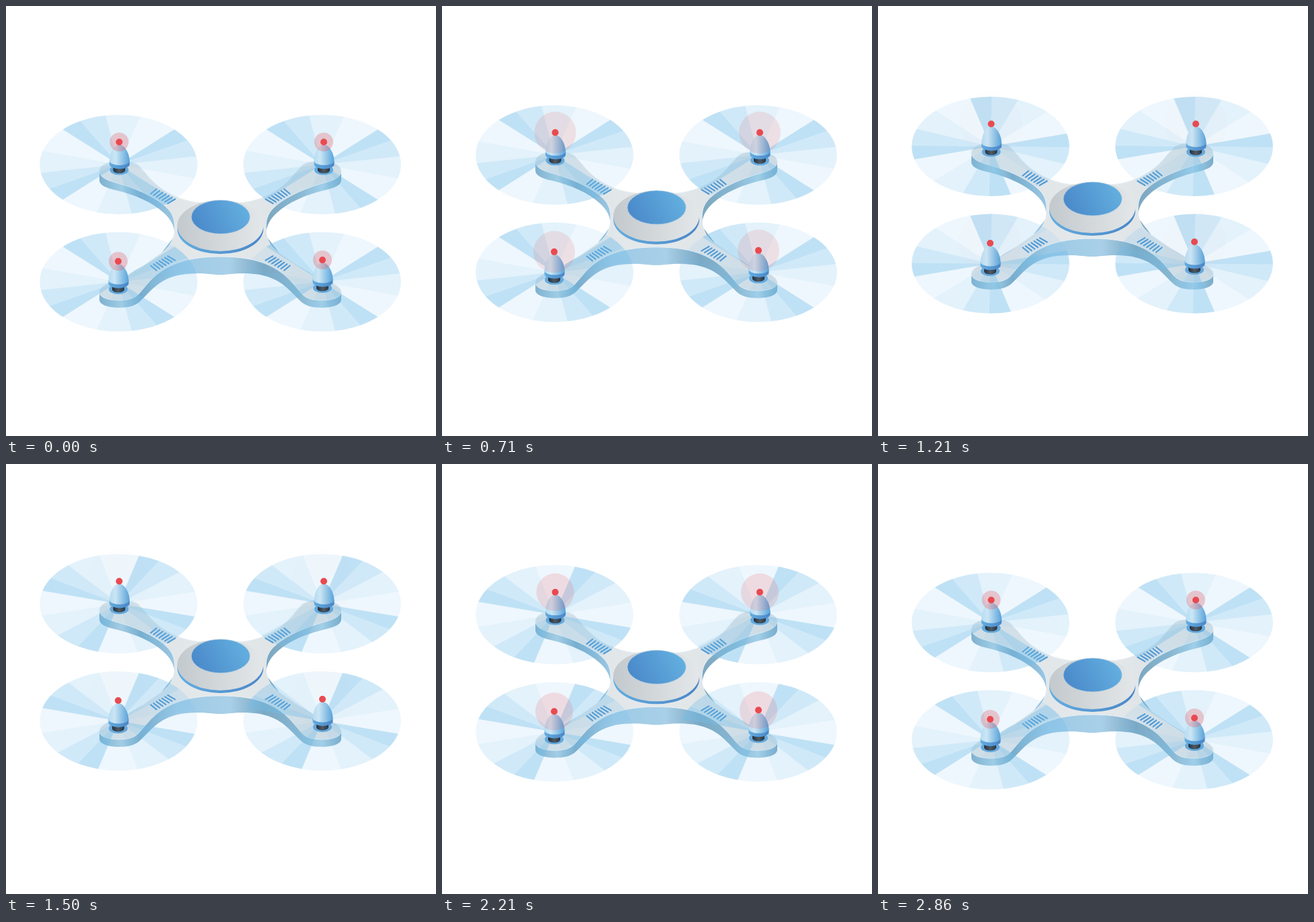
Recreate the animation shown at these times as an HTML page. Size 640 px wide and 640 px high, loop 2930 ms.

```html
<!DOCTYPE html>
<html lang="en">
<head>
<meta charset="utf-8">
<title>Drone</title>
<style>
html, body { margin: 0; width: 100%; height: 100%; overflow: hidden; background: #fff; }
svg { display: block; width: 100%; height: 100%; }
</style>
</head>
<body>
<svg viewBox="0 0 640 640">
  <defs>
    <linearGradient id="side" gradientUnits="userSpaceOnUse" x1="139" x2="499">
      <stop offset="0" stop-color="#7fafcb"/>
      <stop offset=".09" stop-color="#a9cfe3"/>
      <stop offset=".17" stop-color="#79aac8"/>
      <stop offset=".32" stop-color="#9dcae6"/>
      <stop offset=".54" stop-color="#a9d0e8"/>
      <stop offset=".68" stop-color="#7ba6bf"/>
      <stop offset=".82" stop-color="#8ab5cd"/>
      <stop offset=".92" stop-color="#a9d2e8"/>
      <stop offset="1" stop-color="#7aa9c4"/>
    </linearGradient>
    <linearGradient id="deck" gradientUnits="userSpaceOnUse" x1="139" x2="499">
      <stop offset="0" stop-color="#dbe2e6"/>
      <stop offset=".5" stop-color="#e5e9eb"/>
      <stop offset="1" stop-color="#d8dfe3"/>
    </linearGradient>
    <linearGradient id="dome">
      <stop offset="0" stop-color="#c3c9cd"/>
      <stop offset="1" stop-color="#e3e7e9"/>
    </linearGradient>
    <linearGradient id="cap" y1=".6" y2=".3">
      <stop offset="0" stop-color="#4a89ca"/>
      <stop offset="1" stop-color="#64b0e0"/>
    </linearGradient>
    <linearGradient id="rim">
      <stop offset="0" stop-color="#62ade0"/>
      <stop offset="1" stop-color="#4a86c8"/>
    </linearGradient>
    <linearGradient id="cone">
      <stop offset="0" stop-color="#b5dcf2"/>
      <stop offset=".3" stop-color="#cbe6f5"/>
      <stop offset="1" stop-color="#58a3da"/>
    </linearGradient>
    <linearGradient id="shaft">
      <stop offset="0" stop-color="#25303b"/>
      <stop offset=".5" stop-color="#4b5a66"/>
      <stop offset="1" stop-color="#2a3640"/>
    </linearGradient>
    <g id="motor">
      <ellipse cy="41.500" rx="14" ry="7.500" fill="#64a9dd"/>
      <path d="M-9 34v8a9 4.500 0 0 0 18 0v-8z" fill="url(#shaft)"/>
      <path d="M-14.500 28v5a15 7 0 0 0 30 0v-5z" fill="url(#rim)"/>
      <path d="M-14.500 28C-14 17-8.500 4 0 4S15 17 15.500 28A15 6.500 0 0 1-14.500 28z" fill="url(#cone)"/>
      <circle r="5" fill="#e84a50"/>
    </g>
  </defs>
  <g id="drone">
    <path fill="url(#side)" d="M139 246V259C139 267 150 271 163 274C192 281 218 292 235 308C246 318 251 328 251 342
      L228 372L139 426V437C139 445 153 449 168 449C183 449 193 446 200 439L212 427C232 406 252 398 285 398
      C300 398 308 400 319 400C330 400 338 398 353 398C386 398 406 406 426 427L438 439C445 446 455 449 470 449
      C485 449 499 445 499 437V426L410 372L387 342C387 328 392 318 403 308C420 292 446 281 475 274
      C488 271 499 267 499 259V246L319 310z"/>
    <path fill="url(#deck)" stroke="#e8f1f6" d="M139 246C139 237 152 231 168 231C182 231 190 232 197 237L208 249
      C222 268 250 290 292 293H346C388 290 416 268 430 249L441 237C448 232 456 231 470 231C486 231 499 237 499 246
      C499 254 488 259 478 262C448 270 420 282 402 297C391 306 387 316 387 328C387 350 395 360 410 370
      C428 382 442 394 458 402C478 408 499 416 499 426C499 434 485 438 470 438C456 438 446 435 440 428L428 414
      C406 388 376 373 319 373C262 373 232 388 210 414L198 428C192 435 182 438 168 438C153 438 139 434 139 426
      C139 416 160 408 180 402C196 394 210 382 228 370C243 360 251 350 251 328C251 316 247 306 236 297
      C218 282 190 270 160 262C150 259 139 254 139 246z"/>
    <g id="vents" stroke="#4d96d2" stroke-width="2.200" stroke-linecap="round"></g>
    <g id="rotors"></g>
    <ellipse cx="319" cy="332" rx="64" ry="37" fill="url(#rim)"/>
    <ellipse cx="319" cy="327" rx="64" ry="38" fill="url(#dome)"/>
    <ellipse cx="319.500" cy="314" rx="43.500" ry="25" fill="url(#cap)" stroke="#9cc4e4" stroke-width=".6"/>
    <g id="motors"></g>
  </g>
</svg>
<script>
const $ = id => document.getElementById(id);
const RAD = Math.PI / 180;

// One quarter of a rotor disc: [sweep in degrees, opacity], clockwise
const WEDGES = [[16, .45], [19.5, .33], [25.5, .2], [29, .12]];
const ROTORS = [[167.5, 236], [470.5, 236], [167.5, 410.5], [470.5, 410.5]];
const LAMPS = [[168.5, 202.5], [473, 202.5], [167, 380], [471, 378]];

function disc() {
  const point = a => `${Math.cos(a * RAD).toFixed(4)} ${Math.sin(a * RAD).toFixed(4)}`;
  let out = '', angle = -45;
  for (let quarter = 0; quarter < 4; quarter++)
    for (const [sweep, opacity] of WEDGES) {
      out += `<path d="M0 0L${point(angle)}A1 1 0 0 1 ${point(angle + sweep)}z" fill-opacity="${opacity}"/>`;
      angle += sweep;
    }
  return out;
}

const blades = disc();
$('rotors').innerHTML = ROTORS.map(([x, y]) =>
  `<g transform="translate(${x} ${y}) scale(117.3 74)"><g class="spin" fill="#72bce8">${blades}</g></g>`).join('');
$('motors').innerHTML = LAMPS.map(([x, y]) =>
  `<g transform="translate(${x} ${y})"><use href="#motor"/><circle class="glow" fill="#e84a50"/></g>`).join('');

let vents = '';
for (let i = 0; i < 7; i++)
  vents += `M${215.5 + 4.2 * i} ${279.5 + 2.4 * i}L${224 + 4.6 * i} ${272.5 + 2.5 * i}`;
$('vents').innerHTML = ['', 'translate(638) scale(-1 1)', 'translate(0 666) scale(1 -1)', 'translate(638 666) scale(-1)']
  .map(t => `<path d="${vents}" transform="${t}"/>`).join('');

const spinners = document.querySelectorAll('.spin');
const glows = document.querySelectorAll('.glow');

function draw(now) {
  // Shown at 14 steps per second on 10 ms ticks; the motion itself advances in 72 beats at 25 per second
  const step = Math.floor((Math.floor(now % 2930 / 10) + .5) * .14);
  const beat = Math.ceil(step * 25 / 14);
  const lift = (1 - Math.cos(beat / 72 * 2 * Math.PI)) / 2;
  $('drone').setAttribute('transform', `translate(0 ${-28.3 * lift})`);
  spinners.forEach(s => s.setAttribute('transform', `rotate(${30 * beat})`));
  glows.forEach(g => {
    g.setAttribute('r', 14 + 34 * lift);
    g.setAttribute('opacity', .27 * (1 - lift));
  });
  requestAnimationFrame(draw);
}
draw(performance.now());
</script>
</body>
</html>
```
